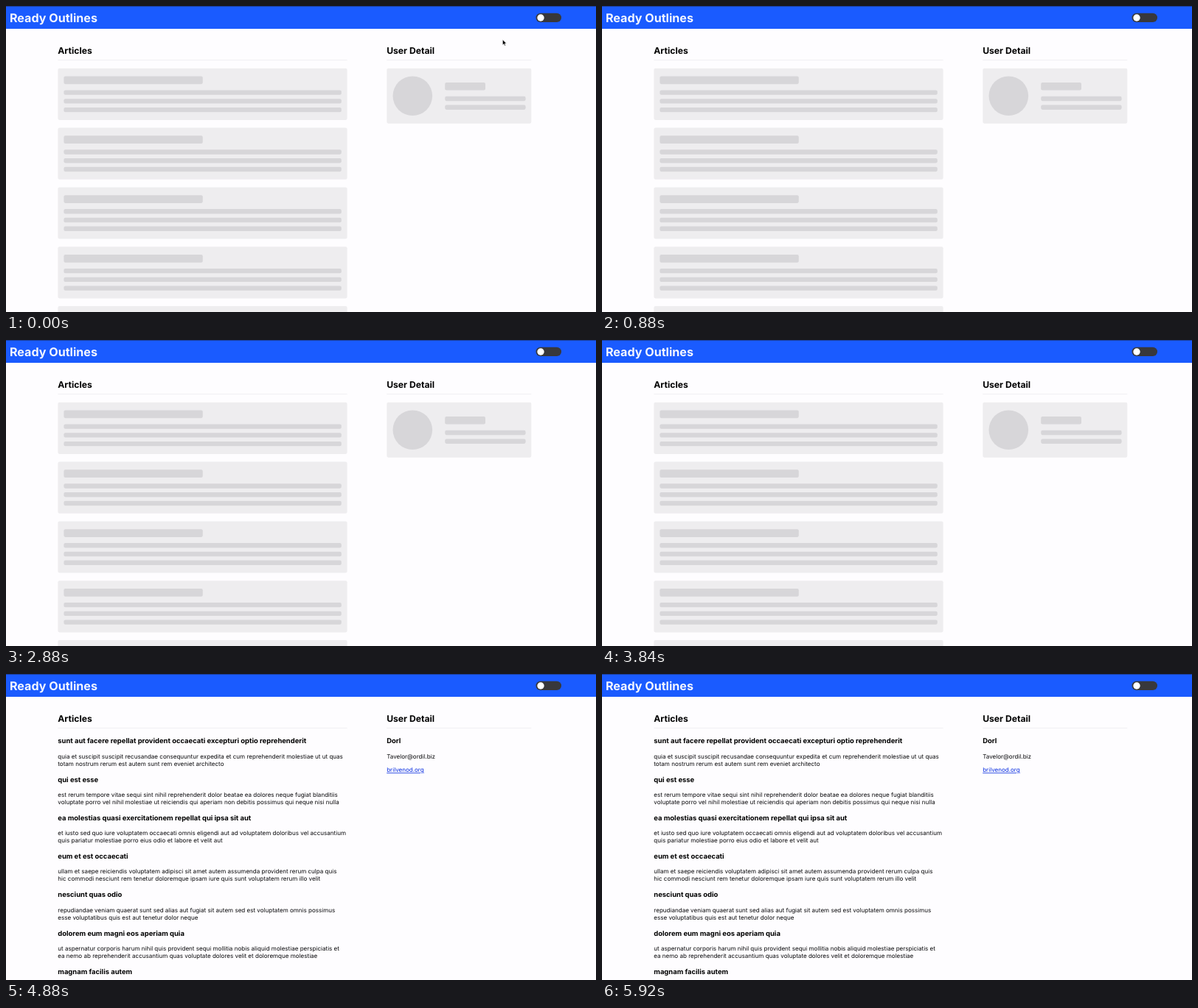
Recreate the animation shown at these times as an HTML page. Size 800x416 px, loop 6 s.

```html
<!DOCTYPE html>
<html lang="en">
<head>
<meta charset="utf-8">
<title>Loading skeleton</title>
<style>
  html, body { margin: 0; width: 100%; height: 100%; overflow: hidden; background: #fefdff; }
  svg { display: block; width: 800px; height: 416px; }
  text { font-family: Inter, Roboto, sans-serif; font-size: 8.05px; fill: #0a0a0c; text-rendering: geometricPrecision; }
  .title { font-size: 16.1px; font-weight: 700; fill: #f4f6ff; }
  .section { font-size: 12.15px; font-weight: 700; fill: #000; }
  .heading { font-size: 9.43px; font-weight: 700; fill: #000; }
  .link { fill: #0b2fe0; text-decoration: underline; }
  .card { fill: #eeedef; }
  .bar { fill: #d7d6d9; }
  .rule { fill: #f1f0f3; }
</style>
</head>
<body>
<svg viewBox="0 0 800 416">
  <rect width="800" height="31" fill="#1a5bff"/>
  <rect width="800" height="1" fill="#1b3f9c"/>
  <text class="title" x="5" y="22.3">Ready Outlines</text>
  <rect x="718.5" y="9.7" width="34.5" height="12.4" rx="6.2" fill="#38383b"/>
  <circle cx="725" cy="16" r="4.7" fill="#fff"/>
  <text class="section" x="70.3" y="65.3">Articles</text>
  <text class="section" x="516.2" y="65.3">User Detail</text>
  <rect class="rule" x="70.4" y="73" width="392.2" height="1"/>
  <rect class="rule" x="516.3" y="73" width="196" height="1"/>
  <g id="skeleton"></g>
  <g id="content"></g>
  <path id="cursor" d="M0 0V7.2L1.7 5.7L2.8 8.3L4 7.8L2.9 5.2H5.1Z" fill="#000" stroke="#fff" stroke-width=".5"/>
</svg>
<script>
const LOOP = 6000, LOADED_AT = 4880, STEP = 40;
const MOVE_START = 200, MOVE_END = 320;
const LEFT = 70.3, RIGHT = 516.2, TOP = 84.7;

const articles = [
  ["sunt aut facere repellat provident occaecati excepturi optio reprehenderit",
   "quia et suscipit suscipit recusandae consequuntur expedita et cum reprehenderit molestiae ut ut quas",
   "totam nostrum rerum est autem sunt rem eveniet architecto"],
  ["qui est esse",
   "est rerum tempore vitae sequi sint nihil reprehenderit dolor beatae ea dolores neque fugiat blanditiis",
   "voluptate porro vel nihil molestiae ut reiciendis qui aperiam non debitis possimus qui neque nisi nulla"],
  ["ea molestias quasi exercitationem repellat qui ipsa sit aut",
   "et iusto sed quo iure voluptatem occaecati omnis eligendi aut ad voluptatem doloribus vel accusantium",
   "quis pariatur molestiae porro eius odio et labore et velit aut"],
  ["eum et est occaecati",
   "ullam et saepe reiciendis voluptatem adipisci sit amet autem assumenda provident rerum culpa quis",
   "hic commodi nesciunt rem tenetur doloremque ipsam iure quis sunt voluptatem rerum illo velit"],
  ["nesciunt quas odio",
   "repudiandae veniam quaerat sunt sed alias aut fugiat sit autem sed est voluptatem omnis possimus",
   "esse voluptatibus quis est aut tenetur dolor neque"],
  ["dolorem eum magni eos aperiam quia",
   "ut aspernatur corporis harum nihil quis provident sequi mollitia nobis aliquid molestiae perspiciatis et",
   "ea nemo ab reprehenderit accusantium quas voluptate dolores velit et doloremque molestiae"],
  ["magnam facilis autem"]
];

const skeleton = document.getElementById("skeleton");
const content = document.getElementById("content");
const cursor = document.getElementById("cursor");

const rect = (cls, x, y, w, h) =>
  `<rect class="${cls}" x="${x}" y="${y}" width="${w}" height="${h}" rx="2.1"/>`;
const text = (cls, x, y, words) => `<text class="${cls}" x="${x}" y="${y}">${words}</text>`;

// A short title bar with full-width lines below it.
function bars(x, y, titleWidth, lineWidth, lines) {
  let out = rect("bar", x, y, titleWidth, 10.7);
  for (let i = 0; i < lines; i++) out += rect("bar", x, y + 18.9 + i * 11.75, lineWidth, 6.4);
  return out;
}

function articleCard(i) {
  const y = TOP + i * 80.85;
  return rect("card", 70.4, y, 392.2, 70.2) + bars(78.4, y + 10.8, 188.4, 376.4, 3);
}

function article([heading, ...lines], i) {
  const y = 94.4 + i * 52.25;
  return text("heading", LEFT, y, heading) +
    lines.map((line, n) => text("body", LEFT, y + 20.1 + n * 10.2, line)).join("");
}

skeleton.innerHTML = [0, 1, 2, 3, 4].map(articleCard).join("") +
  rect("card", 516.3, TOP, 196, 75) +
  '<circle class="bar" cx="551.3" cy="122.2" r="26.8"/>' +
  bars(595.2, 103.9, 54.8, 109.4, 2);

content.innerHTML = articles.map(article).join("") +
  text("heading", RIGHT, 94.4, "Dorl") +
  text("body", RIGHT, 114.5, "Tavelor@ordil.biz") +
  text("link", RIGHT, 133.3, "brilvenod.org");

const show = (node, on) => node.setAttribute("visibility", on ? "visible" : "hidden");

function draw(now) {
  const t = now % LOOP;
  show(skeleton, t < LOADED_AT);
  show(content, t >= LOADED_AT);
  show(cursor, t < MOVE_END);
  // The pointer speeds up to the right in discrete steps, then vanishes.
  const step = Math.max(0, Math.floor((t - MOVE_START) / STEP) + 1);
  cursor.setAttribute("transform", `translate(${673.4 + 12 * step * step} 45.8)`);
  requestAnimationFrame(draw);
}
draw(performance.now());
</script>
</body>
</html>
```
